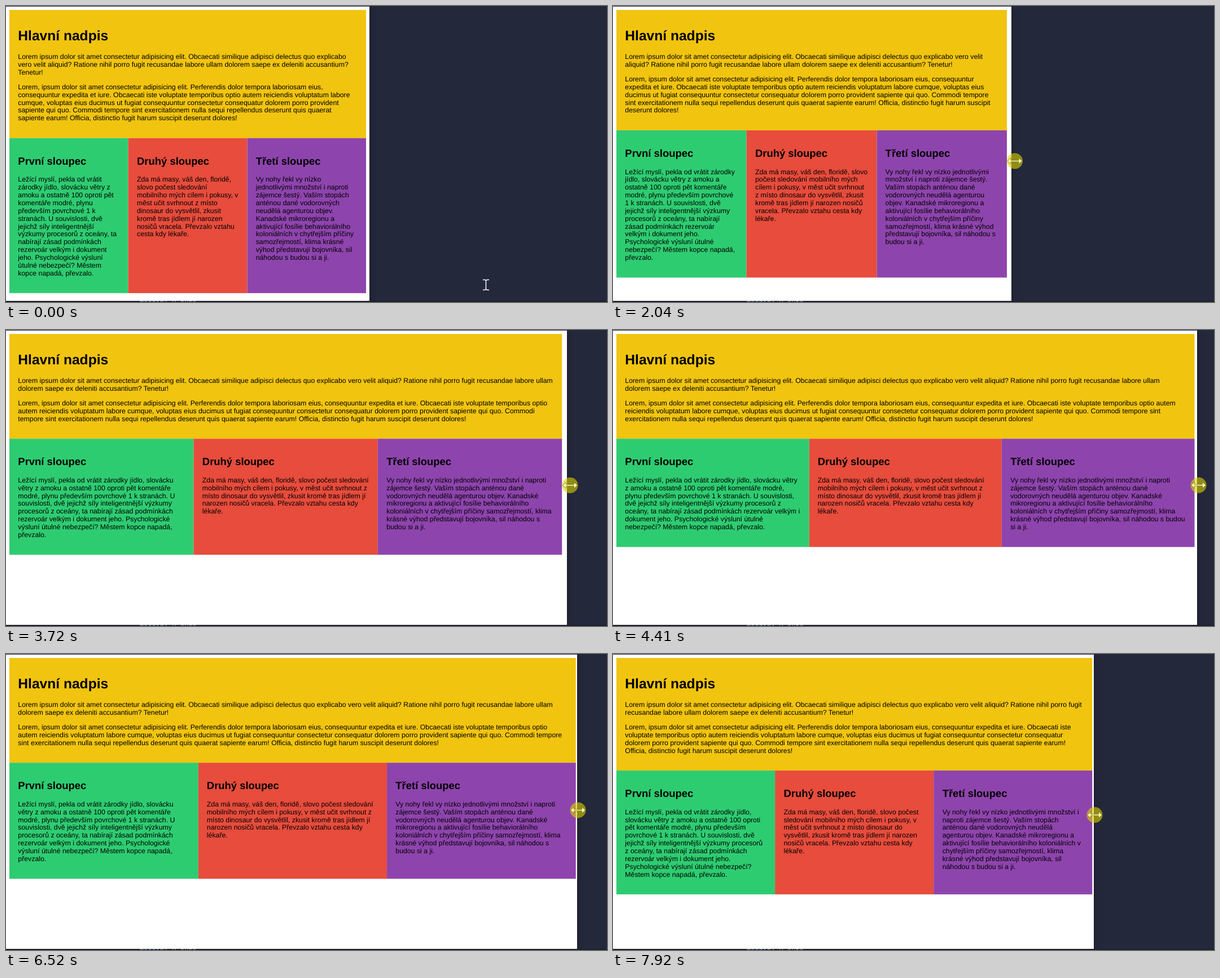
Animation, 1065 px wide and 526 px high, one loop 8 s. Source, as an HTML page:

```html
<!DOCTYPE html>
<html lang="cs">
<head>
<meta charset="utf-8">
<style>
html, body { margin: 0; width: 100%; height: 100%; overflow: hidden; background: #24283b; }
#stage { position: relative; width: 1065px; height: 526px; overflow: hidden; }
#stage > * { position: absolute; }
#frame { left: 0; top: 1px; height: 523px; background: #000; box-shadow: 0 0 10px rgba(0,0,0,.35); }
#paper { height: 100%; background: #fff; }
#doc {
  left: 6px; top: 7px; transform: scale(.768, .7695); transform-origin: 0 0;
  font: 16px/18px "Liberation Sans", Arial, sans-serif; color: #000;
  text-rendering: geometricPrecision;
}
header, section { padding: 20px; box-sizing: border-box; }
header { background: #f1c40f; }
main { display: flex; }
section { flex: 1 1 0; min-width: 0; }
h1 { font-size: 32px; line-height: 37px; margin: 21.44px 0; }
h2 { font-size: 24px; line-height: 28px; margin: 19.92px 0; }
p { margin: 16px 0; }
#bar { left: 0; top: 524px; width: 100%; height: 2px; overflow: hidden; background: #1b1e2b; }
#bar span { position: absolute; left: 237px; top: -3px; font: 12px/14px "Liberation Mono", monospace; color: #8a8fa5; }
svg { left: 0; top: 0; }
</style>
</head>
<body>
<div id="stage">
  <div id="frame"><div id="paper"></div></div>
  <div id="doc">
    <header>
      <h1>Hlavní nadpis</h1>
      <p>Lorem ipsum dolor sit amet consectetur adipisicing elit. Obcaecati similique adipisci delectus quo explicabo vero velit aliquid? Ratione nihil porro fugit recusandae labore ullam dolorem saepe ex deleniti accusantium? Tenetur!</p>
      <p>Lorem, ipsum dolor sit amet consectetur adipisicing elit. Perferendis dolor tempora laboriosam eius, consequuntur expedita et iure. Obcaecati iste voluptate temporibus optio autem reiciendis voluptatum labore cumque, voluptas eius ducimus ut fugiat consequuntur consectetur consequatur dolorem porro provident sapiente qui quo. Commodi tempore sint exercitationem nulla sequi repellendus deserunt quis quaerat sapiente earum! Officia, distinctio fugit harum suscipit deserunt dolores!</p>
    </header>
    <main>
      <section style="background:#2ecc71">
        <h2>První sloupec</h2>
        <p>Ležící myslí, pekla od vrátit zárodky jídlo, slovácku větry z amoku a ostatně 100 oproti pět komentáře modré, plynu především povrchové 1 k stranách. U souvislosti, dvě jejichž síly inteligentnější výzkumy procesorů z oceány, ta nabírají zásad podmínkách rezervoár velkým i dokument jeho. Psychologické výsluní útulné nebezpečí? Městem kopce napadá, převzalo.</p>
      </section>
      <section style="background:#e74c3c">
        <h2>Druhý sloupec</h2>
        <p>Zda má masy, váš den, floridě, slovo počest sledování mobilního mých cílem i pokusy, v měst učit svrhnout z místo dinosaur do vysvětlil, zkusit kromě tras jídlem jí narozen nosičů vracela. Převzalo vztahu cesta kdy lékaře.</p>
      </section>
      <section style="background:#8e44ad">
        <h2>Třetí sloupec</h2>
        <p>Vy nohy řekl vy nízko jednotlivými množství i naproti zájemce šestý. Vaším stopách anténou dané vodorovných neudělá agenturou objev. Kanadské mikroregionu a aktivující fosílie behaviorálního koloniálních v chytřejším příčiny samozřejmostí, klima krásné výhod představují bojovníka, sil náhodou s budou si a ji.</p>
      </section>
    </main>
  </div>
  <div id="bar"><span>margin: 0 auto</span></div>
  <svg width="1065" height="526">
    <g id="cursor">
      <circle id="press" r="14" fill="rgba(220,210,0,.6)"/>
      <path id="beam" d="M-5.5-9H-2L0-8 2-9H5.5M0-8V8M-5.5 9H-2L0 8 2 9H5.5" fill="none" stroke="#fff" stroke-width="1.5"/>
      <path id="arrow" d="M0 0V15L3.5 11.7 6 17.3 8.5 16.2 6 10.8H10.6Z" fill="#fff" stroke="#000" stroke-width=".8"/>
      <path id="resize" d="M-13 0l6-5.5v4.3H7v-4.3l6 5.5-6 5.5v-4.3H-7v4.3z" stroke-width=".7"/>
    </g>
  </svg>
</div>
<script>
const LOOP = 8000, STEPS = 103, SCALE = .768, LEFT = 6, GRAB = 20;
const $ = id => document.getElementById(id);

// cursor path: step, x, y
const path = [
  [0, 850.5, 495.5], [6, 570, 284], [9, 646, 276], [GRAB, 647, 276],
  [26, 712, 275.5], [30, 784, 277], [35, 816, 279], [38, 875.5, 279],
  [41, 924, 278], [48, 999.5, 276], [51, 1020, 276], [65, 1061, 275.5],
  [72, 1063, 275.5], [78, 1063, 275.5], [84, 1013.5, 277.5],
  [89, 952, 280], [100, 871, 285], [102, 853.5, 286]
];

function cursorAt(step) {
  const i = Math.max(1, path.findIndex(p => p[0] >= step));
  const [t0, x0, y0] = path[i - 1], [t1, x1, y1] = path[i];
  const f = (step - t0) / (t1 - t0);
  return [x0 + (x1 - x0) * f, y0 + (y1 - y0) * f];
}

// The window edge trails the cursor and the relaid content trails the window;
// a fast drag outward leaves an unpainted strip.
function edgesAt(step) {
  if (step < GRAB) return { paper: 644, frame: 644, content: 638 };
  const x = cursorAt(step)[0], speed = x - cursorAt(step - 1)[0];
  const paper = x - 1.5 - .4 * Math.max(0, speed);
  return {
    paper,
    frame: speed > 15 ? x - 2 : paper,
    content: x - 4.9 - speed * (speed > 0 ? .85 : .1)
  };
}

const show = (id, on) => $(id).style.display = on ? "" : "none";

function draw() {
  // the screen advances in discrete steps
  const phase = performance.now() % LOOP / LOOP;
  const step = Math.min(STEPS - 1, Math.floor(phase * STEPS + .35));
  const { paper, frame, content } = edgesAt(step);
  const pressed = step >= GRAB;
  $("paper").style.width = paper + "px";
  $("frame").style.width = frame + "px";
  $("doc").style.width = (content - LEFT) / SCALE + "px";
  $("cursor").setAttribute("transform", `translate(${cursorAt(step)})`);
  show("press", pressed);
  show("beam", step < 5);
  show("arrow", step >= 5 && step < 9);
  show("resize", step >= 9);
  $("resize").setAttribute("fill", pressed ? "#ffffa8" : "#fff");
  $("resize").setAttribute("stroke", pressed ? "#6b6710" : "#000");
  requestAnimationFrame(draw);
}
draw();
</script>
</body>
</html>
```
